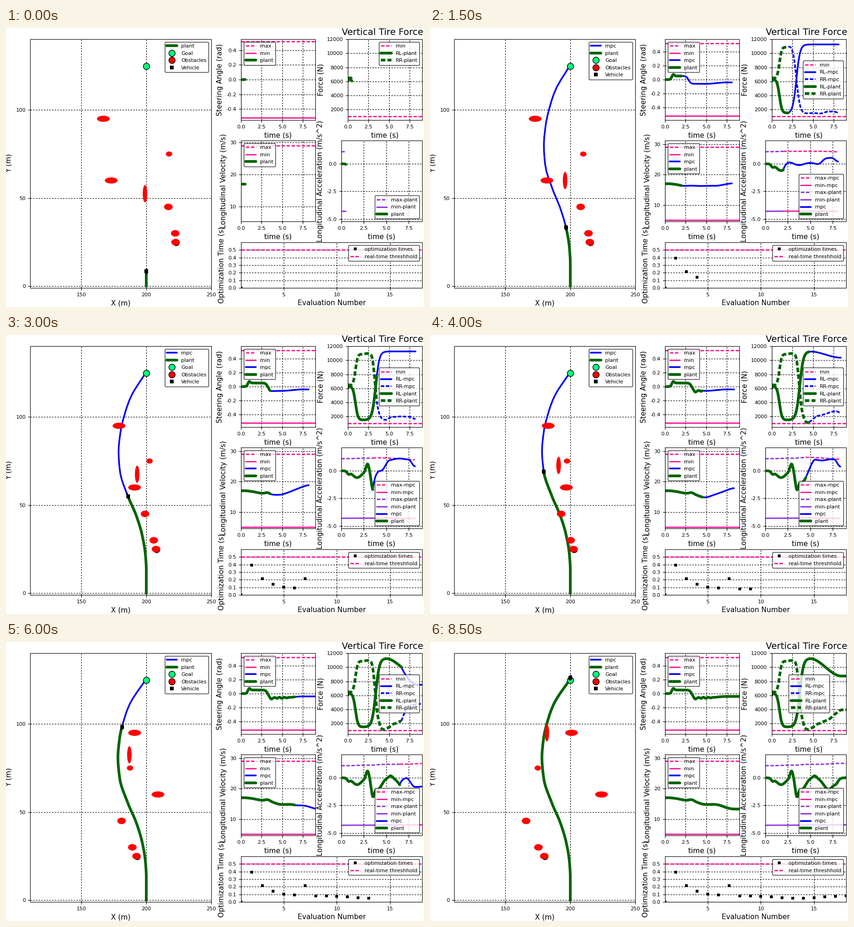
These frames come from a looping animation (900x600 px, 9000 ms). A matplotlib script:

```python
import numpy as np
import matplotlib.pyplot as plt
from matplotlib.animation import FuncAnimation
from matplotlib.patches import Ellipse

W, H, STEPS = 900, 600, 18
PINK, PURPLE, BLUE, GREEN = "#ff1493", "#8a2be2", "#0000ff", "#006400"
THIN_DASH, WIDE_DASH = (0, (5.4, 2.4)), (0, (7, 3.4))

plt.rcParams.update({
    "font.family": "DejaVu Sans", "font.size": 8, "axes.unicode_minus": False,
    "lines.scale_dashes": False, "lines.solid_capstyle": "round",
    "lines.solid_joinstyle": "round", "lines.dash_capstyle": "butt",
    "legend.fontsize": 8, "legend.edgecolor": "black", "legend.framealpha": 0.8,
    "xtick.labelsize": 8, "ytick.labelsize": 8, "axes.axisbelow": True,
})

# Waypoints (y, x) of the driven path
PATH = [(0, 200), (13, 200), (22, 199.3), (33, 196.8), (44, 192.3),
        (55, 185.9), (69, 179.6), (81, 178.2), (92, 179.5), (101, 182.3),
        (111, 187.1), (125.6, 200)]

# Braking and throttle pulses: time, width, strength
PULSES = [(.8, .15, -.22), (1.75, .5, -.62), (2.92, .17, .7), (3.5, .17, -1.2),
          (4.05, .45, -1.05), (5.5, .2, .2), (7.05, .55, -1.05),
          (7.9, .2, -.25)]

# x, y, step in x, step in y, width, height
OBSTACLES = [(167, 95, 2, 0, 9.8, 3.5), (217.5, 75, -2.5, 0, 4.9, 2.9),
             (173, 60, 3, 0, 9.8, 3.5), (199, 52.5, -1, 2.5, 3.5, 9.8),
             (217, 45, -3, 0, 6.6, 3.7), (222.25, 30, -2.75, 0, 6.6, 3.7),
             (222.5, 25, -2.5, 0, 6.6, 3.7)]


def smooth(pts, t):
    """Cubic curve through pts without overshoot."""
    x, y = np.array(pts, float).T
    t = np.clip(t, x[0], x[-1])
    d = np.diff(y) / np.diff(x)
    a, b = d[:-1], d[1:]
    same = a * b > 0
    mid = np.where(same, 2 * a * b / np.where(same, a + b, 1), 0)
    m = np.concatenate(([d[0]], mid, [d[-1]]))
    i = np.clip(np.searchsorted(x, t, side="right") - 1, 0, len(x) - 2)
    h = x[i + 1] - x[i]
    s = (t - x[i]) / h
    return (y[i] + (y[i + 1] - y[i]) * s * s * (3 - 2 * s)
            + h * s * (1 - s) * (m[i] * (1 - s) - m[i + 1] * s))


def bump(t, mid, width):
    return np.exp(-.5 * ((t - mid) / width) ** 2)


def step(t, mid, width):
    return 1 / (1 + np.exp(-(t - mid) / width))


def ease(u):
    u = np.clip(u, 0, 1)
    return u * u * (3 - 2 * u)


def integral(v, t):
    return np.concatenate(([0], np.cumsum((v[1:] + v[:-1]) / 2 * np.diff(t))))


def accel(t):
    return sum(h * bump(t, mid, w) for mid, w, h in PULSES)


def turn(t, early=0):
    return (.052 * step(t, .78, .08) - .112 * step(t, 3.25 - early, .13)
            + .02 * ease((t - 5) / 2.5))


def steer(t):
    ripple = .009 * np.cos(2 * np.pi * (t - 4.05) / .6) * bump(t, 4.8, .6)
    return (turn(t) + .025 * bump(t, 1, .12) - .022 * bump(t, 3.65, .13)
            + ripple)


def left_load(t, early=0, relief=1):
    return (6350 - 200 * np.exp(-t / .2) - 4850 * step(t, .92, .15)
            + 9750 * step(t, 3.38 - early, .22)
            - 2500 * relief * ease((t - 4.6) / 3.8))


def right_load(left, a):
    return 12700 + 500 * a - left


def accel_limits(v):
    return 1.09 + .057 * (17 - v), -4.29 + .01 * (17 - v)


# Drive along the path at the integrated speed
T = np.linspace(0, 9, 901)
SPEED = 17 + integral(accel(T), T)
grid_y = np.linspace(0, 130, 521)
slope = np.gradient(smooth(PATH, grid_y), grid_y)
arc = integral(np.hypot(1, slope), grid_y)
Y = np.interp(integral(SPEED, T), arc, grid_y)

# Aim of the planner over the evaluations: acceleration, delay, end time
PLAN_K = [3, 6, 8, 10, 14]
PLAN_ACCEL = [.5, 1.05, 1, -.7, -.9]
PLAN_DELAY = [3.8, .9, .1, 1.4, 0]
PLAN_END = [8.1, 8.2, 8.35, 8.7, 9.2]


def plan(k, now):
    aim, delay, end = (np.interp(k, PLAN_K, row)
                       for row in (PLAN_ACCEL, PLAN_DELAY, PLAN_END))
    t = np.linspace(now, max(end, now + .3), 60)
    d = t - now
    join = np.exp(-d / .5)
    early = .4 * np.clip((6 - k) / 3, 0, 1)
    relief = np.clip((k - 7) / 2.8, 0, 1.5)

    release = .6 * max(aim, 0) * ease((t - end + .7) / .7)
    ripple = .28 * np.sin(2.6 * d) * np.exp(-d / 3) * max(0, 1 - k / 14)
    a = (accel(now) * np.exp(-d / .3) + aim * ease(d - delay) - release
         + ripple)
    angle = turn(t, early)
    left = left_load(t, early, relief)
    left += (left_load(now) - left[0]) * join
    return dict(t=t, accel=a, left=left, right=right_load(left, a),
                steer=angle + (steer(now) - angle[0]) * join,
                speed=np.interp(now, T, SPEED) + integral(a, t))


def history(now):
    t = T[T <= now + 1e-9]
    left, a = left_load(t), accel(t)
    return dict(t=t, accel=a, left=left, right=right_load(left, a),
                steer=steer(t), speed=SPEED[:len(t)])


fig = plt.figure(figsize=(W / 100, H / 100), dpi=100, facecolor="white")


def panel(x0, y0, x1, y1):
    return fig.add_axes([x0 / W, 1 - y1 / H, (x1 - x0) / W, (y1 - y0) / H])


def label(x, y, text, rotation=0):
    fig.text(x / W, 1 - y / H, text, size=11, rotation=rotation,
             ha="center", va="center")


map_ax = panel(52.4, 24, 442, 559)
steer_ax = panel(506, 24, 666, 198)
force_ax = panel(736, 24, 896, 198)
speed_ax = panel(506, 242, 666, 416)
accel_ax = panel(722, 242, 896, 416)
solve_ax = panel(506, 461, 896, 559)

label(247, 592, "X (m)")
label(701, 592, "Evaluation Number")
for cx, cy in [(586, 231), (816, 231), (586, 449), (809, 449)]:
    label(cx, cy, "time (s)")
label(6.5, 291, "Y (m)", 90)
label(461, 111, "Steering Angle (rad)", 90)
label(678, 111, "Force (N)", 90)
label(468, 329, "Longitudinal Velocity (m/s)", 90)
label(677, 329, "Longitudinal Acceleration (m/s^2)", 90)
label(464, 510, "Optimization Time (s)", 90)
fig.text(816 / W, 1 - 15 / H, "Vertical Tire Forces", size=14, ha="center")


def reset(ax, xlim, ylim, xticks, yticks, xfmt="{:.1f}", yfmt="{:.1f}"):
    ax.cla()
    ax.set(xlim=xlim, ylim=ylim)
    ax.set_xticks(xticks, [xfmt.format(v) for v in xticks])
    ax.set_yticks(yticks, [yfmt.format(v) for v in yticks])
    ax.grid(color="black", lw=0.9, linestyle=(0, (2.2, 2)))


def timed(ax, ylim, yticks, yfmt="{:.1f}"):
    reset(ax, (0, 9), ylim, [0, 2.5, 5, 7.5], yticks, yfmt=yfmt)


def level(ax, v, name, style="-"):
    ax.plot([0, 9], [v, v], color=PINK, lw=2, ls=style, label=name)


def mpc_line(ax, t, v, name="mpc", style="-"):
    ax.plot(t, v, color=BLUE, lw=2.6, ls=style, label=name)


def plant_line(ax, t, v, name="plant", style="-"):
    ax.plot(t, v, color=GREEN, lw=4.2, ls=style, label=name)


def dot(ax, x, y, color, name):
    ax.plot([x], [y], "o", ms=9.8, mfc=color, mec="black", mew=1, label=name)


def draw_map(k, now):
    ax = map_ax
    reset(ax, (110.8, 250), (-1, 140.2), [150, 200, 250], [0, 50, 100],
          "{:d}", "{:d}")
    y0 = np.interp(now, T, Y)
    if k:
        y = np.linspace(y0, max(125, y0), 24)
        s = (y - y0) / max(125 - y0, 1e-6)
        bend = 1.7 * np.clip((9 - k) / 6, 0, 1)
        mpc_line(ax, smooth(PATH, y) + bend * 6.75 * s * s * (1 - s), y)
    y = np.linspace(0, y0, 120)
    plant_line(ax, smooth(PATH, y), y)
    dot(ax, 200, 125, "#00ff7f", "Goal")
    x, y, vx, vy = OBSTACLES[-1][:4]
    dot(ax, x + vx * k + .25, y + vy * k - .1, "red", "Obstacles")
    for x, y, vx, vy, w, h in OBSTACLES:
        ax.add_patch(Ellipse((x + vx * k, y + vy * k), w, h, color="red",
                             lw=0, zorder=3))
    body = y0 + np.array([-1.5, 1.5])
    x0 = smooth(PATH, y0)
    lean = x0 - smooth(PATH, y0 - 1)
    ax.plot(x0 + lean * (body - y0), body, color="black", lw=3.4,
            solid_capstyle="butt", zorder=4)
    ax.plot([x0], [y0], "s", color="black", ms=5.3, mew=0, zorder=4,
            label="Vehicle")
    ax.legend(loc="upper right")


def draw_signals(k, now):
    past = history(now)
    ahead = plan(k, now) if k else None

    def curves(ax, name):
        if ahead:
            mpc_line(ax, ahead["t"], ahead[name])
        plant_line(ax, past["t"], past[name])

    def limits(run, color, tag):
        for v, side, style in zip(accel_limits(run["speed"]), ("max", "min"),
                                  (THIN_DASH, "-")):
            accel_ax.plot(run["t"], v, color=color, lw=2, ls=style,
                          label=f"{side}-{tag}")

    top = .58 if k else .55
    timed(steer_ax, (-top, top), [-.4, -.2, 0, .2, .4])
    level(steer_ax, .52, "max", THIN_DASH)
    level(steer_ax, -.52, "min")
    curves(steer_ax, "steer")
    steer_ax.legend(loc="upper left")

    timed(speed_ax, (4.6, 31.2) if k else (5.36, 30.6), [10, 20, 30], "{:d}")
    level(speed_ax, 29, "max", THIN_DASH)
    level(speed_ax, 5, "min")
    curves(speed_ax, "speed")
    speed_ax.legend(loc="upper left")

    timed(accel_ax, (-5.21, 2.1), [-5, -2.5, 0])
    if ahead:
        limits(ahead, PINK, "mpc")
    limits(past, PURPLE, "plant")
    curves(accel_ax, "accel")
    accel_ax.legend(loc="lower right")

    timed(force_ax, (500, 12000), range(2000, 12001, 2000), "{:d}")
    level(force_ax, 1000, "min", THIN_DASH)
    sides = [("left", "RL", "-", "-"), ("right", "RR", THIN_DASH, WIDE_DASH)]
    if ahead:
        for name, tag, style, _ in sides:
            mpc_line(force_ax, ahead["t"], ahead[name], tag + "-mpc", style)
    for name, tag, _, style in sides:
        plant_line(force_ax, past["t"], past[name], tag + "-plant", style)
    spot = "upper right" if k == 0 else "center right" if k < 17 else "center"
    force_ax.legend(loc=spot)


def draw_solver(k):
    ax = solve_ax
    reset(ax, (1, 18), (0, .6), [5, 10, 15], np.arange(6) / 10, "{:d}")
    n = np.arange(1, k + 2)
    cost = (.08 + .31 * np.exp(-(n - 2) / 1.2) + .13 * bump(n, 7, .3)
            - .033 * bump(n, 13.5, 1.7))
    ax.plot(n, np.where(n > 1, cost, 0), "s", color="black", ms=4, mew=0,
            label="optimization times")
    ax.plot([1, 18], [.5, .5], color=PINK, lw=2, ls=THIN_DASH,
            label="real-time threshhold")
    ax.legend(loc="upper right")


def draw(k):
    now = (k + 1) / 2
    draw_map(k, now)
    draw_signals(k, now)
    draw_solver(k)
    return []


anim = FuncAnimation(fig, draw, frames=STEPS, interval=500, repeat=True)
plt.show()
```
